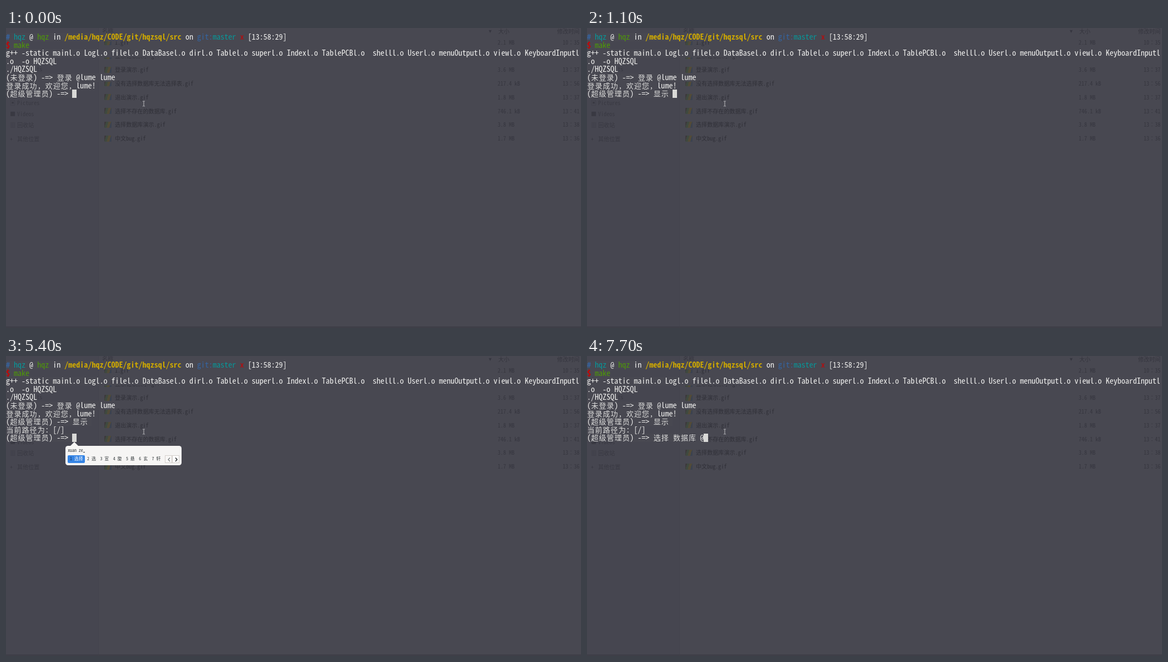
An HTML page for the animation above (8 s loop, 1035 by 541 pixels).

```html
<!DOCTYPE html>
<html lang="zh-CN">
<head>
<meta charset="utf-8">
<title>Terminal session</title>
<style>
html, body { margin: 0; width: 100%; height: 100%; overflow: hidden; background: #484851; }
#stage {
  position: relative; width: 1035px; height: 541px; overflow: hidden; background: #484851;
  font-family: "Noto Sans Mono CJK SC", "Noto Sans CJK SC", "Noto Sans CJK", monospace;
  font-variant-ligatures: none;
}
#stage div, #stage b, #stage i, #stage svg { position: absolute; white-space: pre; }
#stage b, #stage i { font-weight: 400; font-style: normal; }

#side { left: 0; top: 0; width: 166px; height: 541px; background: #464650; border-right: 1px solid #44444d; }
#edge { left: 0; top: 538px; width: 1035px; height: 3px; background: #3f3f48; }
#files b { font-size: 10.1px; line-height: 14px; color: #303038; }
#files b.dim { color: #36363f; }
#files b.faint { color: #393942; }
.thumb {
  width: 13px; height: 11px; border-radius: 1px;
  background: linear-gradient(105deg, #3d3a3c 20%, #3f4a40 20% 45%, #524b38 45% 75%, #3b4250 75%);
}

.bg { height: 14.7px; background: #484851; }
.word { z-index: 1; height: 14.6px; line-height: 13.2px; font-size: 14.04px; color: #f2f2f0; }
#stage .han { width: 14px; text-align: center; font-size: 13px; font-weight: 300; color: #dcdcdb; }
#stage .bold { font-weight: 700; }
.blue { color: #3465a4; } .cyan { color: #06989a; } .green { color: #4e9a06; }
.gold { color: #cfa900; } .red { color: #cc0000; }
#caret { z-index: 2; width: 7.5px; height: 14.4px; background: #d9d9d7; }

#pop {
  z-index: 3; height: 35.5px; border-radius: 4.5px; background: #f6f5f4;
  font-size: 7.9px; line-height: 14px; color: #2e3436;
}
#pop::before {
  content: ""; position: absolute; left: 9px; top: -6.5px;
  border: solid transparent; border-width: 0 7px 7px; border-bottom-color: #f6f5f4;
}
#pre { left: 4.5px; top: 1.5px; }
#pre u { display: inline-block; width: 3px; height: 1px; background: #2e3436; vertical-align: -1px; }
.cand { top: 17px; height: 14px; }
.cand.on { border-radius: 2px; background: #3584e4; color: #fff; }
.cand i { left: 3.75px; top: -1px; }
.cand.on i:first-child { color: #16304f; }
.nav { top: 17px; box-sizing: border-box; width: 13.7px; height: 14.5px; border: 1px solid #d5d0cc; background: #fff; }
.nav.off { background: #f8f7f6; }
.nav svg { left: 3px; top: 3px; }
#mouse { z-index: 4; left: 244px; top: 130px; }
</style>
</head>
<body>
<div id="stage">
  <div id="side"></div>
  <div id="files"></div>
  <div id="edge"></div>
  <div id="term"></div>
  <div id="live"></div>
  <div id="caret"></div>
  <div id="pop"></div>
  <svg id="mouse" width="12" height="18">
    <path id="beam" d="M2 2h1.4l.6.6.6-.6H6M4 2.5v8M2 11h1.4l.6-.6.6.6H6" fill="none" stroke="#bcbcc0" stroke-width="1"/>
    <path id="arrow" d="M4 6v9l2.1-2 1.3 3 1.4-.6-1.3-2.9h2.8z" fill="#111" stroke="#fff" stroke-width=".5"/>
  </svg>
</div>
<script>
const LOOP = 8000, CELL = 7.02, ROW = 14.6, TOP = 9, HALF = 3.95;
const PROMPT = "(超级管理员) -=> ";
const $ = id => document.getElementById(id);
const isHan = c => c > "\u2fff";
const cols = s => [...s].reduce((n, c) => n + (isHan(c) ? 2 : 1), 0);

function add(parent, tag, cls, x, y, text = "") {
  const el = document.createElement(tag);
  el.className = cls;
  el.style.left = x + "px";
  if (y !== null) el.style.top = y + "px";
  el.textContent = text;
  parent.append(el);
  return el;
}

// Terminal text: every Latin word and every Chinese character starts on its own grid column.
function put(layer, row, col, text, cls = "") {
  const y = TOP + row * ROW;
  add(layer, "div", "bg", col * CELL, y).style.width = cols(text) * CELL + "px";
  for (const { 0: part, index } of text.matchAll(/[\u3000-\uffef]|[^\s\u3000-\uffef]+/g)) {
    const x = (col + cols(text.slice(0, index))) * CELL;
    add(layer, "b", `word ${isHan(part) ? "han" : cls}`, x, y, part);
  }
  return col + cols(text);
}

function putRuns(row, runs) {
  let col = 0;
  for (const [text, cls] of runs) col = put($("term"), row, col, text, cls);
}

// File manager showing through the window.
function drawFiles() {
  const f = $("files");
  const label = (x, y, s, cls = "") => add(f, "b", cls, x, y - 7, s);
  label(173, 5, "名称", "dim");
  label(869, 5, "▾", "dim");
  label(886, 6, "大小", "dim");
  label(992, 6, "修改时间", "dim");
  const rows = [
    ["1.gif", "2.1 MB", "10∶35"],
    ["登录错误演示.gif", "", ""],
    ["登录演示.gif", "3.6 MB", "13∶37"],
    ["没有选择数据库无法选择表.gif", "217.4 kB", "13∶56"],
    ["退出演示.gif", "1.8 MB", "13∶37"],
    ["选择不存在的数据库.gif", "746.1 kB", "13∶41"],
    ["选择数据库演示.gif", "3.8 MB", "13∶38"],
    ["中文bug.gif", "1.7 MB", "13∶36"]
  ];
  rows.forEach(([name, size, time], i) => {
    const y = 25.5 + i * 24.8;
    add(f, "div", "thumb", 177, y - 5.5);
    label(196, y, name);
    label(885, y, size, "dim");
    label(1002, y, time, "dim");
  });
  [["▤", "Documents", 74], ["▣", "Pictures", 135], ["■", "Videos", 155], ["▥", "回收站", 175], ["+", "其他位置", 200]]
    .forEach(([icon, name, y]) => { label(7, y, icon, "faint"); label(20, y, name, "faint"); });
}

function drawTerm() {
  putRuns(0, [["# ", "blue bold"], ["hqz", "cyan"], [" @ "], ["hqz", "green"], [" in "],
    ["/media/hqz/CODE/git/hqzsql/src", "gold bold"], [" on "], ["git:", "blue"],
    ["master", "cyan"], [" x ", "red"], ["[13:58:29]"]]);
  putRuns(1, [["$ ", "red bold"], ["make", "green"]]);
  ["g++ -static mainl.o Logl.o filel.o DataBasel.o dirl.o Tablel.o superl.o Indexl.o TablePCBl.o  shelll.o Userl.o menuOutputl.o viewl.o KeyboardInputl",
    ".o  -o HQZSQL", "./HQZSQL", "(未登录) -=> 登录 @lume lume", "登录成功，欢迎您，lume!"]
    .forEach((s, i) => put($("term"), i + 2, 0, s));
}

const X = "下 先 写 系 新 小 想";
const XIAN_SHI = "显示 现实 先是 县市 现时 限时 现世";
// [start ms, command line, typed pinyin, candidates]; the first command is entered at ENTER.
const ENTER = 2000;
const STEPS = [
  [0, ""],
  [300, "", "x", X],
  [400, "", "xia", "下 夏 吓 虾 瞎 侠 峡"],
  [600, "", "xian", "先 现 线 县 限 显 闲"],
  [700, "", "xian s", XIAN_SHI],
  [800, "", "xian shi", XIAN_SHI],
  [1000, "显示"],
  [1100, "显示 "],
  [ENTER, ""],
  [4700, "", "x", X],
  [4800, "", "xu", "需 许 续 须 徐 虚 序"],
  [4900, "", "xu", "需要 许 续 须 徐 虚 序"],
  [5100, "", "xuan", "选 宣 旋 悬 玄 轩 喧"],
  [5200, "", "xuan z", "选择 选中 旋转 宣战 选组 选址 选自"],
  [5400, "", "xuan ze", "选择 选 宣 旋 悬 玄 轩"],
  [5700, ""],
  [5800, "选择"],
  [6000, "选择 "],
  [6400, "选择 ", "s", "是 所 时 说 上 三 四"],
  [6500, "选择 ", "shu", "数 书 树 属 输 术 熟"],
  [6700, "选择 ", "shu j", "数据 书记 书籍 书架 暑假 竖井 树荆"],
  [6800, "选择 ", "shu j k", "数据库 数据卡 数据 暑假 书记 书籍 书架"],
  [7100, "选择 数据库"],
  [7200, "选择 数据库 "],
  [7700, "选择 数据库 @"]
];

function navButton(pop, x, cls, path, color) {
  add(pop, "div", "nav " + cls, x, null).innerHTML =
    `<svg width="7" height="8"><path d="${path}" fill="none" stroke="${color}" stroke-width="1.3"/></svg>`;
}

function drawPopup(caretX, caretY, typed, list) {
  const pop = $("pop");
  pop.textContent = "";
  pop.style.display = typed ? "block" : "none";
  if (!typed) return;
  pop.style.left = caretX - 12.7 + "px";
  pop.style.top = caretY + 21.3 + "px";
  const pre = add(pop, "b", "", 4.5, 1.5, typed);
  pre.id = "pre";
  pre.append(document.createElement("u"));
  let x = 4.5;
  list.split(" ").forEach((word, i) => {
    const w = (2 + cols(word)) * HALF + 7.5;
    const c = add(pop, "div", i ? "cand" : "cand on", x, null);
    c.style.width = w + "px";
    add(c, "i", "", 3.75, null, i + 1);
    add(c, "i", "", 3.75 + 2 * HALF, null, word);
    x += w;
  });
  navButton(pop, x + 3.5, "off", "M5 .5L2 3.8L5 7", "#7d8182");
  navButton(pop, x + 16.5, "", "M2 .5L5 3.8L2 7", "#1c1f20");
  pop.style.width = x + 34.3 + "px";
}

function drawStep([at, cmd, typed, list]) {
  const live = $("live"), entered = at >= ENTER, row = entered ? 9 : 7;
  live.textContent = "";
  if (entered) {
    put(live, 7, 0, PROMPT + "显示 ");
    put(live, 8, 0, "当前路径为: [/]");
  }
  const x = put(live, row, 0, PROMPT + cmd) * CELL, y = TOP + row * ROW;
  $("caret").style.left = Math.floor(x) + "px";
  $("caret").style.top = y + "px";
  drawPopup(x, y, typed, list);
  const over = typed && !entered;
  $("arrow").style.display = over ? "" : "none";
  $("beam").style.display = over ? "none" : "";
}

let shown = null;
const start = performance.now();
function tick() {
  const t = (performance.now() - start) % LOOP;
  const step = STEPS.findLast(s => s[0] <= t) || STEPS[0];
  if (step !== shown) drawStep(shown = step);
  requestAnimationFrame(tick);
}

drawFiles();
drawTerm();
tick();
</script>
</body>
</html>
```
